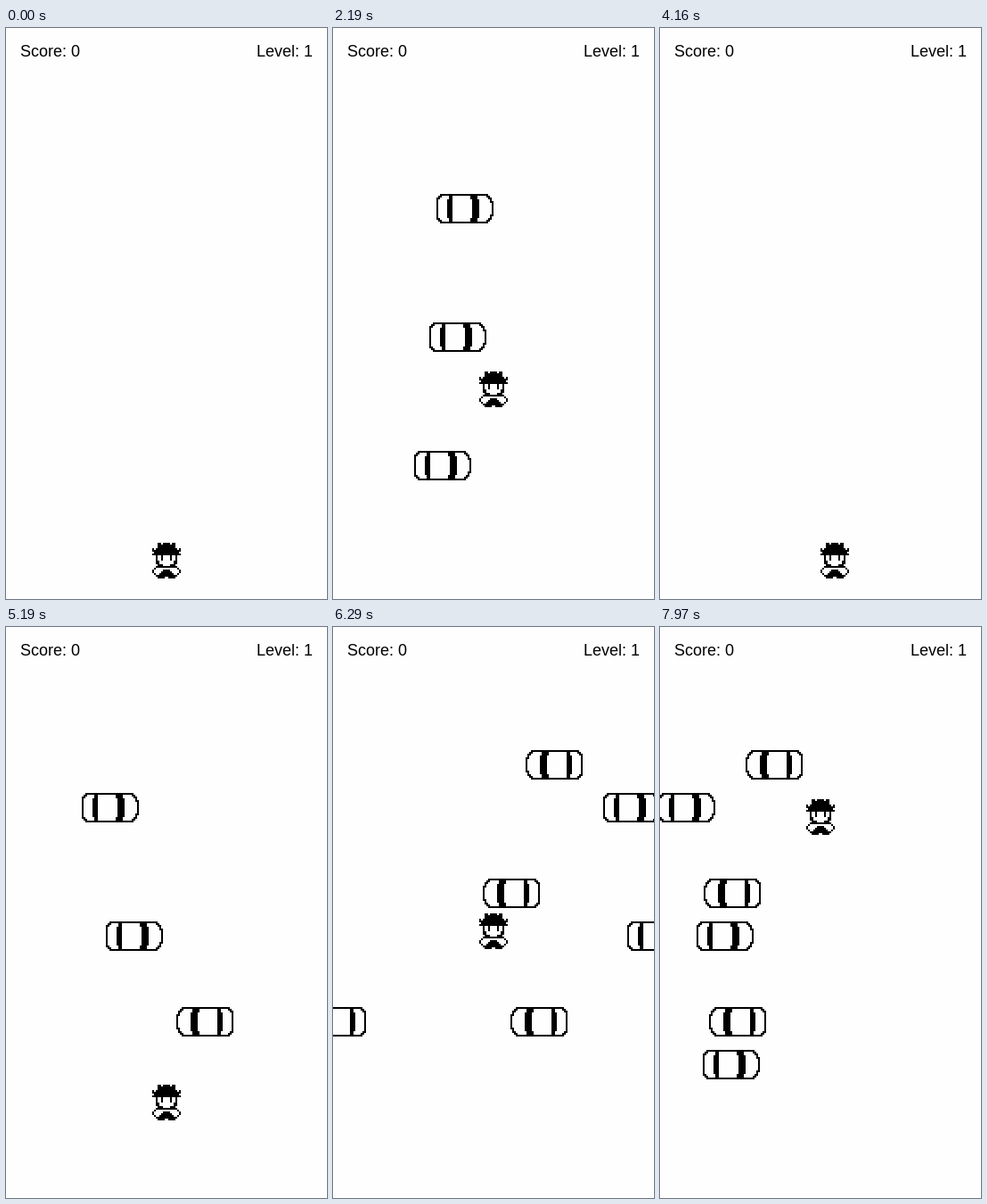
Write an HTML page that moves like this. It is 360 by 640 pixels and loops after 8 s.

```html
<!DOCTYPE html>
<html lang="en">
<head>
<meta charset="utf-8">
<title>Road crossing</title>
<style>
  html, body { margin: 0; width: 100%; height: 100%; overflow: hidden; background: #fefefe; }
  svg { display: block; width: 360px; height: 640px; }
  text { font: 18px "Liberation Sans", Arial, sans-serif; fill: #000; }
  path { fill: #000; shape-rendering: crispEdges; }
</style>
</head>
<body>
<svg id="stage" viewBox="0 0 360 640">
  <text x="16" y="32">Score: 0</text>
  <text x="344" y="32" text-anchor="end">Level: 1</text>
</svg>
<script>
const LOOP = 8000, HOP = 115, STEP = 64, CRASH = 3045;
const CAR_W = 64, STAGE_W = 360;
const stage = document.getElementById('stage');

function add(parent, tag, attrs = {}) {
  const el = document.createElementNS('http://www.w3.org/2000/svg', tag);
  for (const key in attrs) el.setAttribute(key, attrs[key]);
  return parent.appendChild(el);
}

// Path of all grid cells for which ink(x, y) holds
function cells(w, h, ink) {
  let d = '';
  for (let y = 0; y < h; y++)
    for (let x = 0; x < w; x++)
      if (ink(x, y)) d += `M${x} ${y}h1v1h-1z`;
  return d;
}

// Car shell: square-cut tail on the left, rounded nose on the right
function inCar(x, y) {
  const v = Math.min(y, 15 - y);
  const nose = Math.round(Math.max(0, 5 - v) ** 2 / 8);
  return v >= 0 && x >= 0 && x + v >= 2 && 31 - x >= nose;
}

function carInk(x, y) {
  if (!inCar(x, y)) return false;
  for (let i = -1; i <= 1; i++)
    for (let j = -1; j <= 1; j++)
      if (!inCar(x + i, y + j)) return true;
  const bow = Math.min(y, 15 - y) < 3 ? 1 : 0;
  const rear = x >= 6 + bow && x < 9;
  const front = x >= 20 - bow && x < 24 - bow;
  return rear || front;
}

// Symmetric walker; c counts cells out from the middle
function walkerInk(x, y) {
  const c = x < 8 ? 7 - x : x - 8;
  const inOval = (cy, rx, ry) => ((c + .5) / rx) ** 2 + ((y + .5 - cy) / ry) ** 2 < 1;
  if (y === 0) return c < 5 && c % 3 !== 2;
  if (y < 4) return c < 4 + y / 2 || (y === 3 && c === 7);
  if (y < 7) return c < 8 - y % 2;
  const eye = c === 2 && y < 10;
  const jaw = y < 15 && inOval(8.5, 6.5, 6) && !inOval(8.5, 4.8, 4.5);
  const arms = y > 12 && y < 19 && c > 3 && inOval(16, 8, 4) && !inOval(16, 6.8, 2.8);
  const coat = y > 14 && c < Math.min(5, y - 13) && !(y === 19 && c === 0);
  return eye || jaw || arms || coat;
}

const carPath = cells(32, 16, carInk);

// The traffic gets a little faster late in the run
const rolled = t => .198 * t + .01 * Math.max(0, t - 6290);

// Lane top: times at which a car enters
const lanes = {
  138: [2299, 5565, 6700],
  186: [1284, 4437, 7672],
  282: [5322, 6474],
  330: [1324, 2557, 4300, 7465],
  426: [2547, 4339, 5480, 6503],
  474: [1410, 7432]
};

const cars = Object.entries(lanes).flatMap(([y, times]) => times.map(enter => {
  const left = (y - 138) % 144 === 0;
  const el = add(stage, 'g');
  add(el, 'path', {
    d: carPath,
    transform: left ? `translate(${CAR_W} 0) scale(-2 2.0625)` : 'scale(2 2.0625)'
  });
  return { el, y, left, enter };
}));

const walker = add(stage, 'g');
add(walker, 'path', { d: cells(16, 20, walkerInk), transform: 'scale(2)' });

// Times of the key presses
const up = [770, 1350, 1900, 2846, 4500, 5617, 5850, 6050, 6700, 6980];
const right = [3070, 3185];
const left = [2350, 3835, 4075];

function place(el, x, y) {
  el.setAttribute('transform', `translate(${Math.round(x)} ${Math.round(y)})`);
}

function draw(t) {
  const since = t < CRASH ? 0 : CRASH;
  const travel = presses => presses.filter(p => p >= since)
    .reduce((sum, p) => sum + STEP * Math.min(1, Math.max(0, (t - p) / HOP)), 0);
  place(walker, 164 + travel(right) - travel(left), 577 - travel(up));

  for (const { el, y, left, enter } of cars) {
    const d = rolled(t) - rolled(enter);
    el.style.display = enter >= since && t >= enter ? '' : 'none';
    place(el, left ? STAGE_W - d : d - CAR_W, y);
  }
}

const begin = performance.now();
function tick() {
  draw((performance.now() - begin) % LOOP);
  requestAnimationFrame(tick);
}
tick();
</script>
</body>
</html>
```
